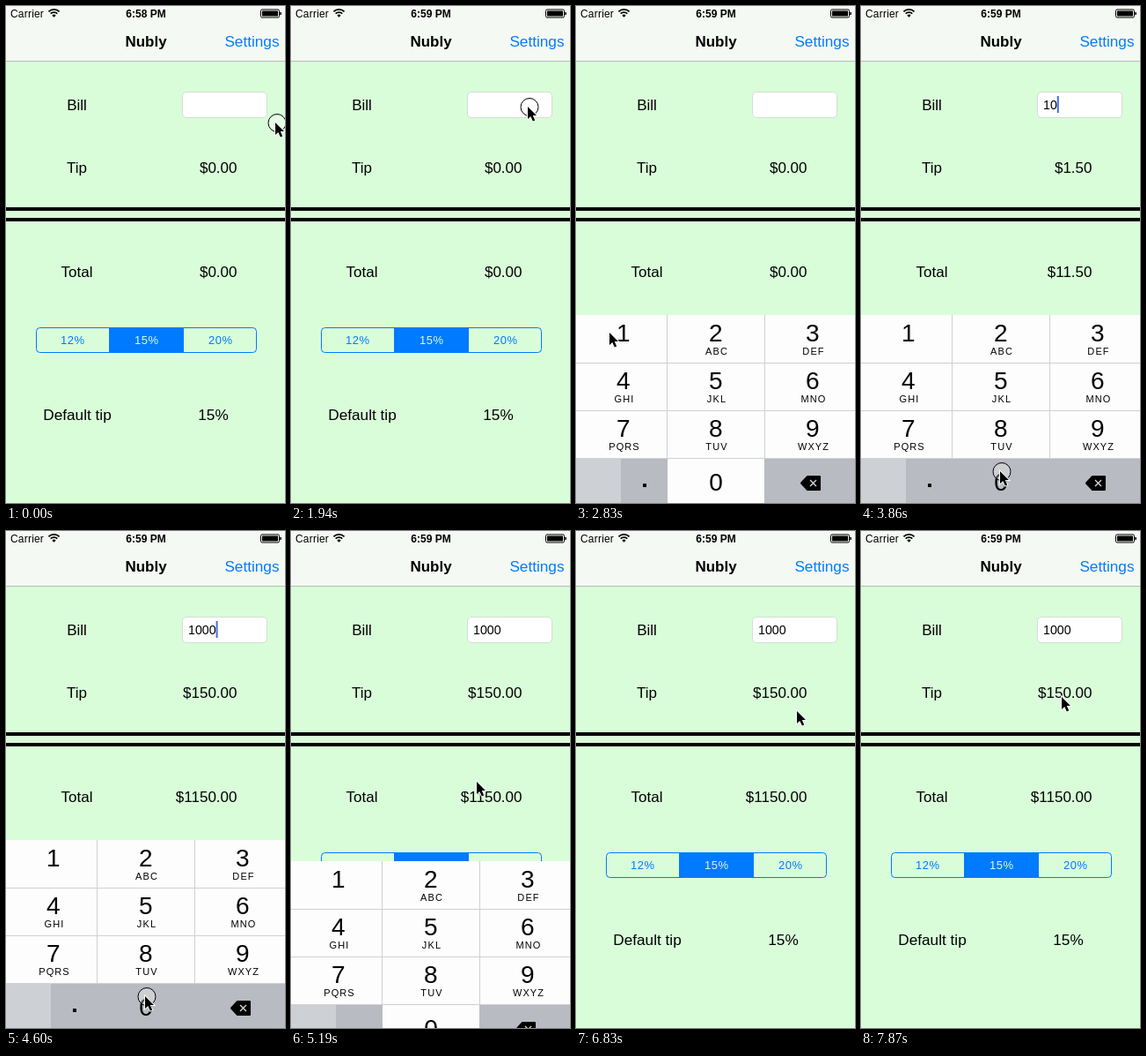
Recreate the animation shown at these times as an HTML page with a canvas. Size 317 by 563 pixels, loop 8 s.

```html
<!DOCTYPE html>
<html lang="en">
<head>
<meta charset="utf-8">
<title>Tip calculator</title>
<style>
html, body { margin: 0; width: 100%; height: 100%; overflow: hidden; background: #d9fdd9; }
canvas { display: block; width: 317px; height: 563px; }
</style>
</head>
<body>
<canvas id="stage"></canvas>
<script>
const W = 317, H = 563, LOOP = 8000, TICK = 148.3;
const BLUE = '#007aff', GREEN = '#d9fdd9', KEY_GRAY = '#b8bbc1';
const FONT = '"Liberation Sans", Arial, sans-serif';
const KEYBOARD_Y = 350, KEYBOARD_H = 213;

const canvas = document.getElementById('stage');
const ctx = canvas.getContext('2d');
const dpr = window.devicePixelRatio || 1;
canvas.width = W * dpr;
canvas.height = H * dpr;

// Pointer path: tick, x, y
const path = [
  [0, 306, 132], [9, 306, 132], [12, 270, 114], [13, 269, 114], [14, 269, 114],
  [19, 38, 370], [21, 38, 370], [25, 158, 527], [32, 158, 527], [34, 211, 284],
  [35, 211, 284], [40, 152, 394], [42, 150, 394], [46, 251, 204], [47, 251, 204],
  [50, 244, 166], [53, 228, 188]
];
const taps = [0, 13, 21, 26, 27, 29, 31, 34];

function pointerAt(k) {
  const i = path.findIndex(p => p[0] >= k);
  if (i < 0) return path[path.length - 1].slice(1);
  if (i === 0) return path[0].slice(1);
  const [ta, xa, ya] = path[i - 1], [tb, xb, yb] = path[i];
  const u = (k - ta) / (tb - ta), e = u * u * (3 - 2 * u);
  return [xa + (xb - xa) * e, ya + (yb - ya) * e];
}

// How far the keyboard is pushed below its resting place
function keyboardDrop(k) {
  if (k < 14) return KEYBOARD_H;
  if (k < 18) return KEYBOARD_H * Math.pow(1 - (k - 13) / 4, 2);
  if (k < 35) return 0;
  return Math.min(KEYBOARD_H, KEYBOARD_H * (1 - Math.pow(1 - (k - 34) / 4, 0.42)) || KEYBOARD_H);
}

function billAt(k) {
  return k < 21 ? '' : k < 26 ? '1' : k < 29 ? '10' : k < 31 ? '100' : '1000';
}

function text(str, x, y, size, { align = 'left', color = '#000', weight = 'normal', gap = 0 } = {}) {
  ctx.font = `${weight} ${size}px ${FONT}`;
  ctx.letterSpacing = gap + 'px';
  ctx.textAlign = align;
  ctx.fillStyle = color;
  ctx.fillText(str, x, y);
}

function rect(x, y, w, h, color) {
  ctx.fillStyle = color;
  ctx.fillRect(x, y, w, h);
}

function box(x, y, w, h, r, fill, stroke) {
  ctx.beginPath();
  ctx.roundRect(x, y, w, h, r);
  if (fill) { ctx.fillStyle = fill; ctx.fill(); }
  if (stroke) { ctx.strokeStyle = stroke; ctx.lineWidth = 1; ctx.stroke(); }
}

function polygon(points) {
  ctx.beginPath();
  points.forEach(([x, y]) => ctx.lineTo(x, y));
  ctx.closePath();
}

function drawHeader(k) {
  rect(0, 0, W, 62, '#f5f9f4');
  rect(0, 62, W, 1, '#b5bdb5');
  text('Carrier', 5, 12.5, 12, { gap: 0.2 });
  text(k < 7 ? '6:58 PM' : '6:59 PM', 159, 12.5, 12, { align: 'center', weight: 'bold' });

  ctx.strokeStyle = '#000';
  ctx.lineWidth = 1.7;
  for (const r of [5.4, 8.6]) {
    ctx.beginPath();
    ctx.arc(54.5, 12.5, r, -Math.PI * 0.75, -Math.PI * 0.25);
    ctx.stroke();
  }
  ctx.beginPath();
  ctx.moveTo(54.5, 12.8);
  ctx.arc(54.5, 12.8, 3, -Math.PI * 0.75, -Math.PI * 0.25);
  ctx.fillStyle = '#000';
  ctx.fill();

  box(289.5, 4, 21, 9, 1.5, null, '#000');
  box(291, 5.5, 18, 6, 0.5, '#000');
  rect(311.3, 7, 1.5, 3, '#000');

  text('Nubly', 159, 46, 17, { align: 'center', weight: 'bold' });
  text('Settings', 310.5, 46, 17.2, { align: 'right', color: BLUE });
}

function drawForm(k) {
  const bill = billAt(k), money = v => '$' + v.toFixed(2);
  text('Bill', 80.5, 117.5, 17, { align: 'center' });
  text('Tip', 80.5, 188.5, 17, { align: 'center' });
  text('Total', 80.5, 306.5, 17, { align: 'center' });
  text('Default tip', 81, 468.5, 17.2, { align: 'center' });

  box(200.5, 97.5, 96, 29, 4.5, '#fff', '#d3dfd3');
  text(bill, 207, 117, 14.2);
  const caret = (k >= 14 && k < 18) || (k >= 21 && k < 34);
  if (caret) {
    const x = 207 + (bill ? ctx.measureText(bill).width : 0);
    rect(x, 102, 2, 19, '#426bf2');
  }

  text(money(bill * 0.15), 262.5, 188.5, 17, { align: 'right' });
  text(money(bill * 1.15), 262.5, 306.5, 17, { align: 'right' });
  text('15%', 235.5, 468.5, 17.2, { align: 'center' });

  rect(0, 228, W, 4, '#000');
  rect(0, 240, W, 4, '#000');

  box(34.5, 364.5, 250, 28, 4, null, BLUE);
  rect(117, 364, 85, 29, BLUE);
  ['12%', '15%', '20%'].forEach((s, i) =>
    text(s, 75.7 + i * 84, 383, 13, { align: 'center', color: i === 1 ? GREEN : BLUE, gap: 0.5 }));
}

const letters = ['', 'ABC', 'DEF', 'GHI', 'JKL', 'MNO', 'PQRS', 'TUV', 'WXYZ'];
const centers = [54, 159, 269];

function drawKeyboard(k) {
  const drop = Math.round(keyboardDrop(k));
  if (drop >= KEYBOARD_H) return;
  ctx.save();
  ctx.translate(0, KEYBOARD_Y + drop);
  rect(0, 0, W, KEYBOARD_H, '#fcfdfc');
  if (k === 21) rect(0, 0, 103, 54, KEY_GRAY);
  rect(0, 162, 51, 51, '#cdd1d6');
  rect(51, 162, 53, 51, KEY_GRAY);
  rect(214, 162, 103, 51, KEY_GRAY);
  if (k > 25 && taps.includes(k) && k < 34) rect(104, 162, 110, 51, KEY_GRAY);

  for (const y of [54, 108, 162]) rect(0, y, W, 1, '#cfd1d2');
  for (const x of [103, 214]) rect(x, 0, 1, 162, '#cfd1d2');

  letters.forEach((s, i) => {
    const x = centers[i % 3], y = Math.floor(i / 3) * 54;
    text(i + 1, x - 0.3, y + 30, 28, { align: 'center' });
    text(s, x + 1, y + 45.3, 11, { align: 'center', gap: 1.1 });
  });
  text('0', centers[1], 199, 28, { align: 'center' });
  rect(76, 191, 4, 4, '#000');

  polygon([[256, 190.5], [263, 183], [277, 183], [277, 198], [263, 198]]);
  ctx.fillStyle = ctx.strokeStyle = '#000';
  ctx.lineJoin = 'round';
  ctx.lineWidth = 2;
  ctx.fill();
  ctx.stroke();
  ctx.strokeStyle = '#d4d7db';
  ctx.lineWidth = 1.4;
  ctx.beginPath();
  for (const d of [-1, 1]) {
    ctx.moveTo(266, 190.5 - 3.5 * d);
    ctx.lineTo(273, 190.5 + 3.5 * d);
  }
  ctx.stroke();
  ctx.restore();
}

const arrow = [[0, 0], [0, 14], [3.3, 11], [5.8, 16.5], [8.2, 15.4], [5.8, 10], [10, 10]];

function drawPointer(k) {
  const [x, y] = pointerAt(k);
  ctx.save();
  ctx.translate(Math.round(x), Math.round(y));
  if (taps.includes(k)) {
    ctx.beginPath();
    ctx.arc(2, 0.5, 10, 0, Math.PI * 2);
    ctx.fillStyle = 'rgba(255,255,255,0.3)';
    ctx.fill();
    ctx.strokeStyle = '#000';
    ctx.lineWidth = 1;
    ctx.stroke();
  }
  polygon(arrow);
  ctx.lineJoin = 'miter';
  ctx.strokeStyle = '#fff';
  ctx.lineWidth = 1.8;
  ctx.stroke();
  ctx.fillStyle = '#000';
  ctx.fill();
  ctx.restore();
}

function draw(ms) {
  const k = Math.min(53, Math.floor(ms / TICK + 0.01));
  ctx.setTransform(dpr, 0, 0, dpr, 0, 0);
  rect(0, 0, W, H, GREEN);
  drawHeader(k);
  drawForm(k);
  drawKeyboard(k);
  drawPointer(k);
}

const start = performance.now();
function loop() {
  draw((performance.now() - start) % LOOP);
  requestAnimationFrame(loop);
}
loop();
</script>
</body>
</html>
```
